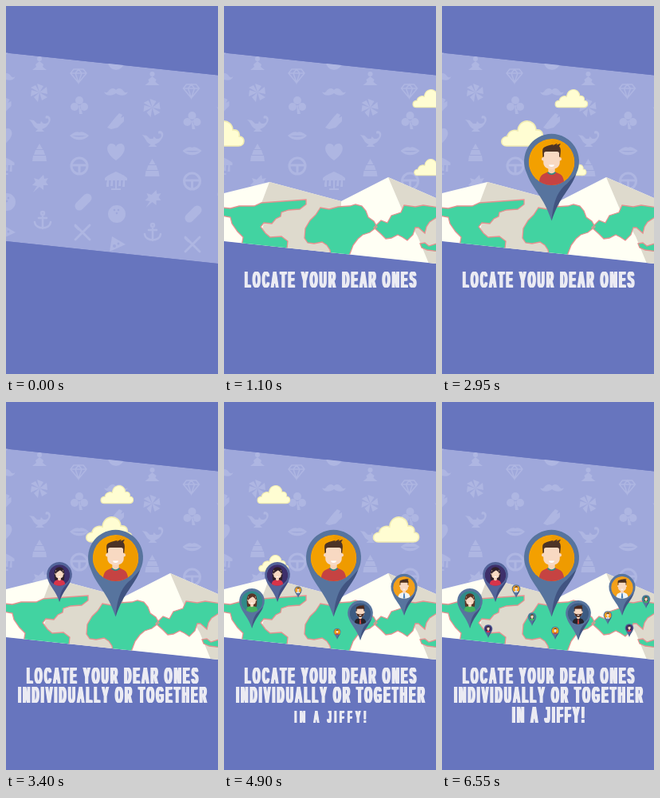
Recreate the animation shown at these times as an HTML page with a canvas. Size 266 by 460 pixels, loop 7000 ms.

```html
<!DOCTYPE html>
<html lang="en">
<head>
<meta charset="utf-8">
<title>Locate your dear ones</title>
<style>
html, body { margin: 0; width: 100%; height: 100%; overflow: hidden; background: #6775be; }
canvas { display: block; }
</style>
</head>
<body>
<canvas id="stage" width="266" height="460"></canvas>
<script>
const ctx = document.getElementById('stage').getContext('2d');
const LOOP = 7000, STEP = 50;
const path = d => new Path2D(d);
const disc = (x, y, r) => `M${x - r} ${y}a${r} ${r} 0 1 1 ${2 * r} 0a${r} ${r} 0 1 1 ${-2 * r} 0z`;

function fill(shape, color, rule = 'nonzero') {
  ctx.fillStyle = color;
  ctx.fill(shape, rule);
}
function stroke(shape, color, width) {
  ctx.strokeStyle = color;
  ctx.lineWidth = width;
  ctx.stroke(shape);
}
function at(x, y, scale, draw) {
  ctx.save();
  ctx.translate(x, y);
  ctx.scale(scale, scale);
  draw();
  ctx.restore();
}
// Eased progress from 0 to 1, starting at `start` and lasting `length` ms
function ease(t, start, length) {
  const p = Math.min(1, Math.max(0, (t - start) / length));
  return 1 - (1 - p) ** 3;
}

// ---- Wallpaper icons: x, y, shape, line width (0 = filled), lower rows ----
const BAND = path('M0 58.5L266 86.5V322L0 294z');
const ICONS = [
  [42, 73, disc(0, -7, 3) + 'M0-4L5 0 4 3 9 7H-9L-4 3-5 0z', 0],
  [91, 87, 'M-6-8H6L10-3 0 9-10-3zM-10-3H10M-4-3L0 9 4-3 0-8z', 1.5],
  [138, 70, disc(0, 0, 10), 0],
  [42, 108, 'M0 0L-3-11 5-8zM0 0L9-7 10 2zM0 0L10 6 3 10zM0 0L-2 12-7 6zM0 0L-11 5-10-3zM0 0L-11-6-5-9z', 0],
  [92, 124, disc(0, -6, 5) + disc(-6, 2, 5) + disc(6, 2, 5) + 'M-1 0H1L4 11H0z', 0],
  [138, 107, 'M0-2C4-6 8-3 10 0 12 2 14 1 15 0 13 6 5 6 0 2-5 6-13 6-15 0-14 1-12 2-10 0-8-3-4-6 0-2z', 0],
  [43, 146, 'M-14-4L-8-3-4 1H0L1-2 4 1H7C13-1 10-8 7-5 4-12 16-9 12-1 9 5 5 7 2 8L5 11H-6L-3 8C-9 6-9 0-14-4z', 0],
  [92, 162, 'M-12 0C-8-3-4-6 0-4 4-6 8-3 12 0 6 7-6 7-12 0zM-9 0Q0 3 9 0 0 0-9 0z', 0],
  [138, 144, 'M-11 8C-6 2-2-4 4-10L8-8 6-4 10-6 10 0 2 8-6 10z', 0],
  [42, 184, 'M0-12L4-5H-4zM-5-4H5L7 2H-7zM-8 3H8L9 10H-9z', 0],
  [92, 200, disc(0, 0, 10) + 'M-9-1H9M0 0V9', 3],
  [138, 182, 'M0 11C-16 0-11-10-6-10-3-10-1-9 0-6 1-9 3-10 6-10 11-10 16 0 0 11z', 0],
  [43, 222, 'M4-11L5-6 10-7 7-2 10 2 4 2 4 8-1 4-9 11-4 3-10 2-6-2-8-7-2-5z', 0],
  [138, 219, 'M-14-4C-10-8-6-9 0-12 6-9 10-8 14-4V-1H-14zM-1-1H1V9H6V11H-6V9H-1zM-11-1H-9V7H-12V3zM-6-1H-4V6H-7zM4-1H6V6H3zM9-1H11V7H8z', 0],
  [97, 245, 'M-5 5L5-5', 11, 1],
  [46, 268, disc(0, -9, 2) + 'M0-7V10M-5-3H5M-10 2C-9 12 9 12 10 2', 2.5, 1],
  [139, 260, disc(0, 0, 11) + disc(-3, -5, 1.3) + disc(2, -5, 1.3) + disc(0, -1, 1.3), 0, 1],
  [96, 283, 'M-9-9L9 9M9-9L-9 9M-9-8L-5-4M5-5L8-8', 2.8, 1],
  [139, 298, 'M-6-10L11 0-9 9z' + disc(-3, 2, 2) + disc(2, -1, 1.5), 0, 1],
].map(([x, y, d, line, low]) => ({ x, y, shape: path(d), line, dx: low ? 138 : 141.5, dy: low ? 15 : 19 }));

function wallpaper() {
  fill(BAND, '#9fa8db');
  ctx.lineCap = 'round';
  for (const { x, y, shape, line, dx, dy } of ICONS)
    for (const k of [-1, 0, 1])
      at(x + k * dx, y + k * dy, 1, () =>
        line ? stroke(shape, '#aeb6e2', line) : fill(shape, '#aeb6e2', 'evenodd'));
}

// ---- Landscape ----
const LIGHT = path('M0 234L57 220 147 244 206 214 266 240V430H0z');
const SHADE = path('M57 220L147 244V330H62L46 285 53 262 46 249zM206 214L266 240V322H257L243 288 224 256z');
const LAND = path(
  'M-3 252L8 253 19 250 38 250 47 246 75 244 103 242 103 248 95 254 81 255 72 258 71 263 65 266 60 272 50 271 46 276 52 284 58 289 72 288 80 294 78 312H20L24 289 17 282 10 272 8 264-3 262z' +
  'M101 290L102 278 108 268 115 261 121 252 132 254 143 251 158 250 165 248 173 250 178 256 181 264 188 269 192 276 183 283 174 286 168 291 162 299 154 320H135L133 305 129 299 123 295 113 297 105 296z' +
  'M188 277L197 268 205 271 210 262 222 258 226 249 240 251 250 249 270 252V262L258 270 254 276 252 284 244 277 240 277 237 286 230 293 224 289 218 286 210 290 203 291 197 285z' +
  'M246 297L252 296 257 300 270 296V307L255 305 248 302z');

function landscape(t) {
  const hills = 110 * (1 - ease(t, 100, 600)), map = 80 * (1 - ease(t, 250, 550));
  if (t < 100) return;
  at(0, hills, 1, () => { fill(LIGHT, '#fffff4'); fill(SHADE, '#dedacd'); });
  at(0, hills + map, 1, () => { fill(LAND, '#42d3a1'); stroke(LAND, '#e3918f', 1.3); });
}

const CLOUD = path('M-22 15C-30 15-31 4-21 3C-20-4-12-6-8-4C-7-20 14-20 15-5C21-6 24-2 23 3C31 3 31 15 22 15z');
function cloud(x, y, scale) {
  at(x, y, scale, () => { fill(CLOUD, '#fffdd2'); stroke(CLOUD, '#f1ecb4', 1.6); });
}
function clouds(t) {
  const s = t / 1000, left = 313.5 - 51.3 * s;
  cloud(left, 116, .71);
  cloud(left, 202, .65);
  cloud(-67.5 + 57.8 * s, 160, 1);
}

// ---- People ----
const FACE = {
  circle: path(disc(0, 0, 76)),
  half: path('M0-76A76 76 0 0 1 0 76z'),
  shirt: path('M-43 80L-41 63C-38 47-33 42-24 38L-13 33H13L24 38C33 42 38 47 41 63L43 80z'),
  neck: path('M-11 10H11V34Q0 44-11 34z'),
  collar: path('M-13 34Q0 46 13 34'),
  head: path('M-27-36H27V2C27 16 14 24 0 24S-27 16-27 2z' + disc(-27, -10, 6) + disc(27, -10, 6)),
  smile: path('M-9 9.5H9A9 6 0 0 1-9 9.5z'),
  spiky: path('M-29-16L-30-36C-30-44-27-48-21-50C-14-54-4-56 6-58L4-54C10-58 16-60 19-61L16-55C21-59 26-60 30-60L25-52C29-48 30-42 30-36L28-16L25-18V-28C25-32 22-34 18-34H-18C-22-34-25-32-25-28V-18z'),
  long: path('M-34 36C-38-10-42-58 0-58S38-10 34 36z'),
  fringe: path('M-28-8C-34-60 34-60 28-8C24-24 14-30 4-36-4-26-20-24-28-8z'),
  beard: path('M-27-4C-18 8 18 8 27-4C28 34-28 34-27-4z'),
  tie: path('M-4 40H4L7 76H-7z'),
};

function person({ bg, shirt, hair, style, trim }) {
  ctx.save();
  ctx.clip(FACE.circle);
  fill(FACE.circle, bg);
  if (style === 'spiky') fill(FACE.half, '#ef9b00');
  if (style === 'long') fill(FACE.long, hair);
  fill(FACE.shirt, shirt);
  fill(FACE.neck, '#f6d2b8');
  if (style === 'spiky') stroke(FACE.collar, trim, 4);
  else if (trim) fill(FACE.tie, trim);
  fill(FACE.head, '#f8d9c2');
  if (style === 'beard') fill(FACE.beard, hair);
  fill(style === 'long' ? FACE.fringe : FACE.spiky, hair);
  fill(FACE.smile, '#fff');
  ctx.restore();
}

const son = { bg: '#f3a000', shirt: '#c64342', hair: '#4c3326', style: 'spiky', trim: '#2b8c86' };
const aunt = { bg: '#3d2f6b', shirt: '#d8344a', hair: '#30202a', style: 'long' };
const mother = { bg: '#2f8b88', shirt: '#45b45c', hair: '#5b3526', style: 'long' };
const uncle = { bg: '#3d5b82', shirt: '#25232c', hair: '#49291f', style: 'beard', trim: '#c8423f' };
const father = { bg: '#f3a01a', shirt: '#eef3f7', hair: '#4a3022', style: 'plain', trim: '#4b7fb5' };

// ---- Map pins, drawn from the tip upwards ----
const BLUE = '#57749e', NAVY = '#53649a';
const PIN = path('M-31-59A34.5 34.5 0 1 1 31-59C24-39 10-31 0 0C-10-31-24-39-31-59z');
const PIN_SHADE = path('M0 0C2-24 8-38 19-46L31-59C24-39 10-31 0 0z');
const PINS = [
  [67, 250, .46, NAVY, aunt, 3000],
  [35, 283, .46, BLUE, mother, 3500],
  [171, 298, .46, BLUE, uncle, 3900],
  [226, 267, .48, BLUE, father, 4300],
  [93, 245, .155, BLUE, father, 4700],
  [142, 297, .15, BLUE, son, 4700],
  [113, 280, .155, BLUE, mother, 5000],
  [208, 278, .155, BLUE, father, 5100],
  [58, 295, .155, NAVY, aunt, 5250],
  [235, 294, .155, NAVY, aunt, 5400],
  [256, 258, .155, BLUE, mother, 5500],
];

function pin(x, y, scale, color, who) {
  at(x, y, scale, () => {
    fill(PIN, color);
    fill(PIN_SHADE, 'rgba(35, 40, 90, .42)');
    if (who) at(0, -73, .38, () => person(who));
  });
}

function people(t) {
  for (const [x, y, scale, color, who, start] of PINS)
    if (t > start) pin(x, y, scale * ease(t, start, 400), color, who);
  if (t > 2300) pin(137.5, 268.5, 1, BLUE);
  const size = ease(t, 1550, 300) * (1 - .62 * ease(t, 2350, 450));
  if (size) at(137.5, 195, size, () => person(son));
}

// ---- Captions: condensed capitals, each letter growing from its baseline ----
const CONDENSE = .4, TRACKING = 2.75, SPACE = 6, HEAVY = [-1.2, -.6, 0, .6, 1.2];
const LINES = [
  ['LOCATE YOUR DEAR ONES', 351.5, 550],
  ['INDIVIDUALLY OR TOGETHER', 376, 3000],
  ['IN A JIFFY!', 401, 4750],
];

function captions(t) {
  ctx.font = 'bold 29.6px "Liberation Sans", Arial, sans-serif';
  ctx.textAlign = 'center';
  ctx.fillStyle = '#ebebf3';
  for (const [text, y, start] of LINES) {
    const size = ease(t, start, 400);
    if (!size) continue;
    const widths = [...text].map(c => c === ' ' ? SPACE : ctx.measureText(c).width * CONDENSE + TRACKING);
    let x = 133.5 - widths.reduce((a, b) => a + b) / 2;
    widths.forEach((w, i) => {
      at(x + w / 2, y, size, () => {
        ctx.scale(CONDENSE, 1);
        for (const dx of HEAVY) ctx.fillText(text[i], dx / CONDENSE, 0);
      });
      x += w;
    });
  }
}

function frame(now) {
  const t = Math.floor(now % LOOP / STEP) * STEP;
  ctx.fillStyle = '#6775be';
  ctx.fillRect(0, 0, 266, 460);
  ctx.save();
  ctx.clip(BAND);
  wallpaper();
  landscape(t);
  clouds(t);
  ctx.restore();
  people(t);
  captions(t);
  requestAnimationFrame(frame);
}
requestAnimationFrame(frame);
</script>
</body>
</html>
```
